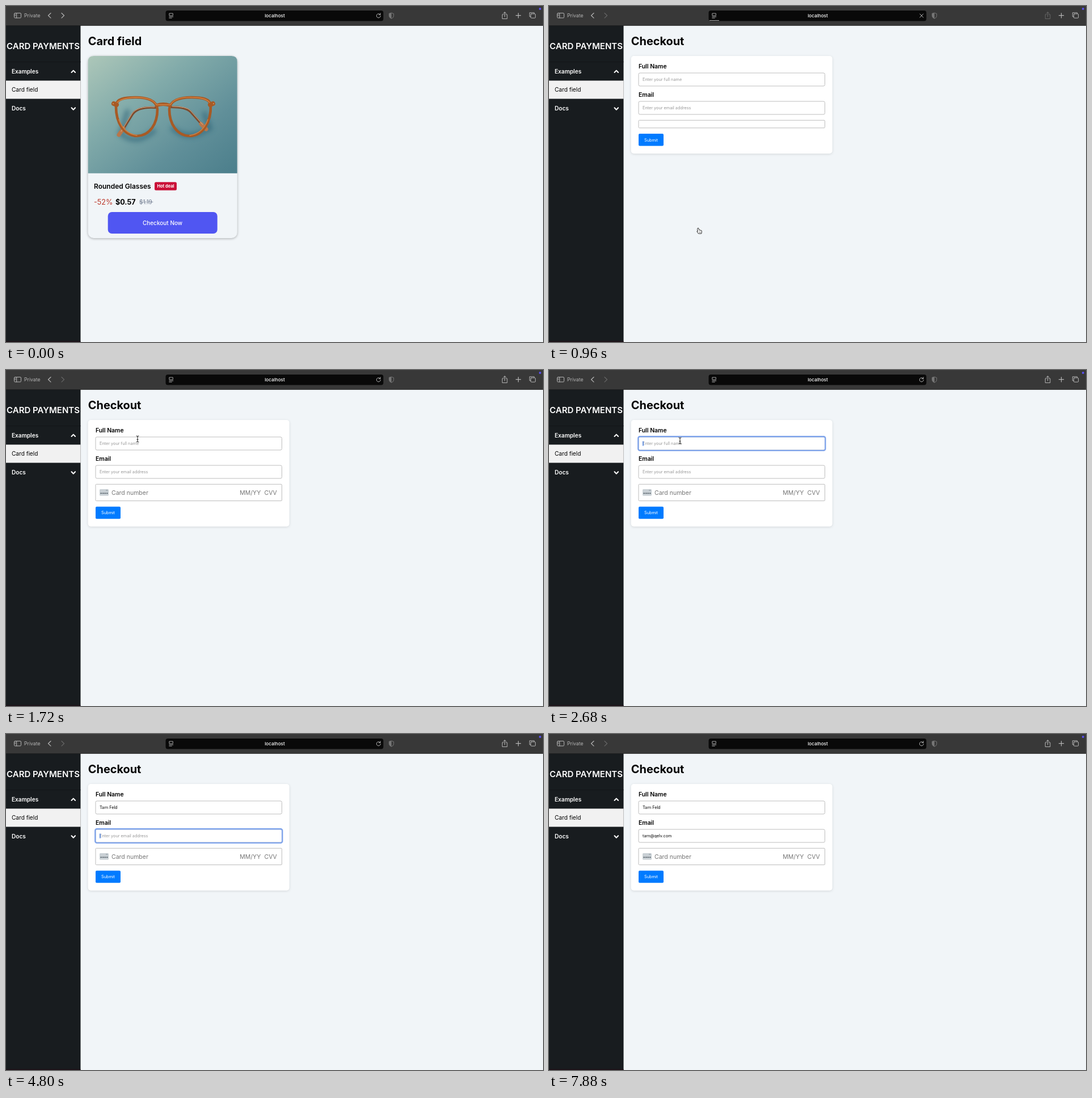
Write an HTML page that moves like this. It is 947 by 592 pixels and loops after 8000 ms.

```html
<!DOCTYPE html>
<html lang="en">
<head>
<meta charset="utf-8">
<title>Card payments</title>
<style>
  html, body { margin: 0; width: 100%; height: 100%; overflow: hidden; background: #f1f5f8; }
  svg { display: block; width: 947px; height: 592px; font-family: Inter, "Open Sans", sans-serif; }
  text { white-space: pre; }
  .b { font-weight: 700; }
  .s { font-weight: 600; }
  .m { font-weight: 500; }
  .mid { text-anchor: middle; }
  .white { fill: #fff; }
  .hint { fill: #999; font-size: 7.3px; }
  .typed { font-size: 7.2px; }
  .blank { fill: #757575; font-size: 10.5px; }
  .line { fill: none; stroke-linecap: round; stroke-linejoin: round; }
  .field { fill: #fff; stroke: #bdbdbd; }
  .ring { fill: none; stroke: #80a5ec; stroke-width: 2.4; }
  #form { filter: drop-shadow(0 1px 2px rgba(0, 0, 0, .12)); }
</style>
</head>
<body>
<svg viewBox="0 0 947 592">
  <defs>
    <linearGradient id="wall" x1="0" y1="0" x2="1" y2="1">
      <stop offset="0" stop-color="#adc7b9"/>
      <stop offset=".35" stop-color="#82abaa"/>
      <stop offset=".7" stop-color="#608f99"/>
      <stop offset="1" stop-color="#4b7e8b"/>
    </linearGradient>
    <filter id="soft" x="-20%" y="-40%" width="140%" height="180%"><feGaussianBlur stdDeviation="4"/></filter>
  </defs>

  <rect width="947" height="592" fill="#f1f5f8"/>

  <!-- sidebar -->
  <rect y="34" width="131.5" height="558" fill="#181c1f"/>
  <rect y="98" width="131.5" height="1" fill="#121518"/>
  <rect y="131.5" width="131.5" height="32" fill="#f1f1f1"/>
  <rect y="590.5" width="131.5" height="1.5" fill="#1d0f16"/>
  <g class="white s">
    <text class="mid" x="65.5" y="75.5" font-size="15">CARD PAYMENTS</text>
    <text x="10" y="119" font-size="10.1">Examples</text>
    <text x="10" y="183.6" font-size="10.1">Docs</text>
  </g>
  <text x="10" y="151" font-size="10.1">Card field</text>
  <path class="line" stroke="#fff" stroke-width="2" d="M115.5 117l3.3-3.4 3.3 3.4M115.5 179.3l3.3 3.4 3.3-3.4"/>

  <!-- browser bar -->
  <rect width="947" height="34.5" fill="#383838"/>
  <rect y="34" width="947" height=".7" fill="#1c1c1c"/>
  <rect x="281.5" y="8" width="384" height="18.5" rx="4" fill="#090909"/>
  <g class="line" stroke="#b4b4b4">
    <rect x="14.5" y="12.5" width="12" height="8.5" rx="1.5"/>
    <path d="M18.7 12.5v8.5M16 15h1M16 17h1"/>
    <path stroke-width="1.2" d="M79 12.5l-4.5 4.3 4.5 4.3"/>
    <path id="forward" stroke-width="1.2" d="M98 12.5l4.5 4.3-4.5 4.3"/>
    <path stroke-width=".9" d="M288.3 13h6v4h-6zM287.8 19h7M287.8 21.2h4.5"/>
    <path id="reload" d="M660 15.2a3.6 3.6 0 1 0 .6 2.4M657.6 15.4h2.6v-2.6"/>
    <path id="stop" d="M654 14l6 6.2M660 14l-6 6.2"/>
    <path id="share" d="M877.5 15h-2.3v7.5h8.6V15h-2.3M879.5 19v-8M877 13.2l2.5-2.5 2.5 2.5"/>
    <path stroke-width="1.2" d="M899.3 16.7h8.4M903.5 12.5v8.4"/>
    <path d="M925 18.8h-1.7v-7h8.2v1.8"/>
    <rect x="925.4" y="13.8" width="8.2" height="7.4" rx="1.2"/>
    <path stroke="#777" d="M679.7 12.2l4 1.3v4.2q0 2.8-4 4.5-4-1.7-4-4.5v-4.2z"/>
  </g>
  <path fill="#777" d="M679.7 12.2v10q-4-1.7-4-4.5v-4.2z"/>
  <text x="32" y="20.2" font-size="8.7" fill="#b4b4b4">Private</text>
  <text class="mid white m" x="474" y="20.2" font-size="8.2">localhost</text>
  <rect id="progress" x="283" y="25" height="1" fill="#aaa"/>
  <circle cx="941.8" cy="5" r="2" fill="#5b50ee"/>

  <text id="title" class="b" x="144.8" y="68.5" font-size="19.9"></text>

  <!-- product page -->
  <g id="product">
    <rect id="card" x="144.7" y="88" width="263" height="321" rx="10" fill="#f1f5f8"/>
    <path fill="url(#wall)" d="M144.7 294.7V98q0-10 10-10h243q10 0 10 10v196.700z"/>
    <path class="line" filter="url(#soft)" stroke="#2f6478" stroke-width="8" opacity=".65"
          d="M201 224q28 24 60-4M294 216q28 24 64 0M214 186l-10 34M350 190l10 26"/>
    <g class="line">
      <path stroke="#7d4c2f" stroke-width="4" d="M264 179q-32-2-41 12l-20 32M291 178q26 0 34 8l25 28"/>
      <path stroke="#b9764a" stroke-width="7" d="M207 216l-8 11M344 208l9 9"/>
      <path stroke="#d9b18d" stroke-width="1" d="M262 178q-31-2-40 12l-19 31M293 177q25 0 32 7l22 25"/>
      <g stroke="#a75a25" stroke-width="4.6">
        <path id="lens" d="M194 174C193 205 208 229 232 229C254 228 267 207 267 182C266 166 248 161 228 161C208 161 196 164 194 174z"/>
        <use href="#lens" transform="matrix(-1 0 0 1 555 0)"/>
        <path stroke-width="6" d="M266 175q11-4 23 0"/>
        <path stroke-width="8" d="M190 172l5 2M365 172l-5 2"/>
      </g>
      <path stroke="#d38243" stroke-width="1.3" d="M196 170q8-8 32-9 30 0 37 13h25q8-14 37-13 25 0 32 9M199 200q9 25 32 28M356 200q-9 25-32 28"/>
      <path stroke="#efc997" stroke-width="1.5" d="M189 172h.1M366 172h.1"/>
    </g>
    <text class="s" x="155" y="322" font-size="12">Rounded Glasses</text>
    <rect x="262" y="310.300" width="39" height="14.500" rx="2.5" fill="#ca1138"/>
    <text class="mid white b" x="281.5" y="320.300" font-size="7.400">Hot deal</text>
    <text x="155" y="350" font-size="12.600" fill="#bb3528">-52%</text>
    <text class="b" x="193" y="350" font-size="12.600">$0.57</text>
    <text x="235" y="348.700" font-size="10" fill="#707c90">$1.19</text>
    <path stroke="#707c90" stroke-width=".8" d="M235 345.300h24.300"/>
    <rect x="179.700" y="363" width="193" height="38" rx="7" fill="#5056f2"/>
    <text class="mid white m" x="276" y="385.800" font-size="10">Checkout Now</text>
  </g>

  <!-- checkout page -->
  <g id="checkout">
    <rect id="form" x="144.700" y="88" width="355" rx="5" fill="#fff"/>
    <text class="s" x="158" y="110.300" font-size="10.400">Full Name</text>
    <text class="s" x="158" y="160.300" font-size="10.400">Email</text>
    <g id="name"></g>
    <g id="email" transform="translate(0 50)"></g>
    <rect id="cardField" class="field" x="158" y="201.300" width="328.500" rx="1.500"/>
    <g id="cardInputs">
      <rect x="165" y="210" width="16" height="11.500" rx="1.500" fill="#c9d0d5"/>
      <path stroke="#505b63" stroke-width="1.600" stroke-dasharray="2.500 1" d="M166.500 217.300h13.500"/>
      <path stroke="#8d979e" d="M176 212h3.500"/>
      <text class="blank" x="186" y="220">Card number</text>
      <text class="blank" x="412.300" y="220">MM/YY</text>
      <text class="blank" x="455.500" y="220">CVV</text>
    </g>
    <g id="submit">
      <rect x="158" y="225" width="44" height="21.500" rx="2" fill="#007bff"/>
      <text class="mid white" x="180" y="238.500" font-size="7.300">Submit</text>
    </g>
  </g>

  <!-- pointers, hot spot at 0,0 -->
  <g id="arrow"><path stroke="#fff" stroke-width=".8" d="M0 0v11l2.600-2.400 1.700 3.800 1.700-.8-1.700-3.600h3.600z"/></g>
  <g id="hand"><path class="line" style="fill:#fff" stroke="#111" stroke-width=".9"
    d="M-1.800-4.500q1-1.200 1.700.2l1 3.200 3 .3q1.700.4 1.500 2.200l-.6 3.600H-.5l-2.700-3.700q0-1.300 1.700-.2l-.6-2z"/>
    <path stroke="#111" stroke-width=".6" d="M1.200 1.500v2M2.900 1.500v2"/></g>
  <g id="beam"><path class="line" stroke="#222" d="M-2-5q2 0 2 1.500 0-1.500 2-1.500M0-3.500v8M-2 6q2 0 2-1.500 0 1.500 2 1.500M-1 1.500h2"/></g>
</svg>
<script>
const LOOP = 8000, PAGE_SWAP = 960, LOADED = 1240;
const $ = id => document.getElementById(id);
const clamp = v => Math.max(0, Math.min(1, v));
const progress = (t, from, to) => clamp((t - from) / (to - from));
const ease = p => p * p * (3 - 2 * p);
const show = (el, on) => { el.style.display = on ? '' : 'none'; };
const set = (id, name, value) => $(id).setAttribute(name, value);

const inputs = [
  { id: 'name', hint: 'Enter your full name', value: 'Tarn Feld', focus: 2480, blur: 4560,
    keys: [3040, 3320, 3480, 3640, 3800, 4000, 4160, 4240, 4360] },
  { id: 'email', hint: 'Enter your email address', value: 'tarn@qelv.com', focus: 4600, blur: 7880,
    keys: [5120, 5280, 5440, 5640, 5920, 6360, 6640, 6880, 7080, 7240, 7400, 7520, 7640] }
];

for (const input of inputs) {
  $(input.id).innerHTML = `
    <rect class="field" x="158" y="118" width="328.500" height="23" rx="2.500"/>
    <rect class="ring" x="157.300" y="117.200" width="330" height="24.700" rx="3"/>
    <text x="165" y="132.200"></text>
    <rect class="caret" y="125.500" width="1.300" height="8.200" fill="#2f70e0"/>`;
  const find = selector => $(input.id).querySelector(selector);
  Object.assign(input, { ring: find('.ring'), text: find('text'), caret: find('.caret') });
}

function drawInput({ hint, value, focus, blur, keys, ring, text, caret }, t) {
  const typed = value.slice(0, keys.filter(k => k <= t).length);
  const focused = t >= focus && t < blur;
  text.textContent = typed || hint;
  text.setAttribute('class', typed ? 'typed' : 'hint');
  show(ring, focused);
  show(caret, focused);
  if (focused) caret.setAttribute('x', 165.300 + (typed ? text.getComputedTextLength() : 0));
}

// Pointer stops: time, x, y
const stops = [[80, 292, 330], [400, 292, 330], [720, 264, 396], [1240, 264, 396],
               [1720, 232, 121], [1800, 232, 121], [2040, 231, 124], [LOOP, 231, 124]];

function drawPointer(t) {
  const next = Math.max(1, stops.findIndex(s => s[0] > t));
  const [a, b] = [stops[next - 1], stops[next]];
  const p = ease(progress(t, a[0], b[0]));
  const x = a[1] + (b[1] - a[1]) * p, y = a[2] + (b[2] - a[2]) * p;
  let shape = 'arrow';
  if (t < 80 || t >= 3040) shape = '';
  else if (t < 1200 && y > 363) shape = 'hand';
  else if (t > LOADED && y < 141) shape = 'beam';
  for (const id of ['arrow', 'hand', 'beam']) {
    show($(id), id === shape);
    set(id, 'transform', `translate(${x} ${y})`);
  }
}

function draw(t) {
  const paying = t >= PAGE_SWAP, loaded = t >= LOADED, busy = t >= 800 && t < LOADED + 120;
  const grow = loaded ? 15.700 : 0;
  const hover = progress(t, 0, 120);

  $('title').textContent = paying ? 'Checkout' : 'Card field';
  show($('product'), !paying);
  show($('checkout'), paying);
  show($('reload'), !busy);
  show($('stop'), busy);
  set('forward', 'stroke', paying ? '#666' : '#b4b4b4');
  set('share', 'stroke', paying && !loaded ? '#666' : '#b4b4b4');
  show($('progress'), paying && busy);
  set('progress', 'width', 17 + 363 * ease(progress(t, 1000, LOADED + 80)));

  $('card').style.filter =
    `drop-shadow(0 ${1 + 3 * hover}px ${2 + 3 * hover}px rgba(0,0,0,${.3 - .06 * hover}))`;

  set('form', 'height', 172 + grow);
  set('cardField', 'height', 13.500 + grow);
  show($('cardInputs'), loaded);
  set('submit', 'transform', `translate(0 ${grow})`);
  inputs.forEach(input => drawInput(input, t));
  drawPointer(t);
}

function frame() {
  draw(performance.now() % LOOP);
  requestAnimationFrame(frame);
}
frame();
</script>
</body>
</html>
```
